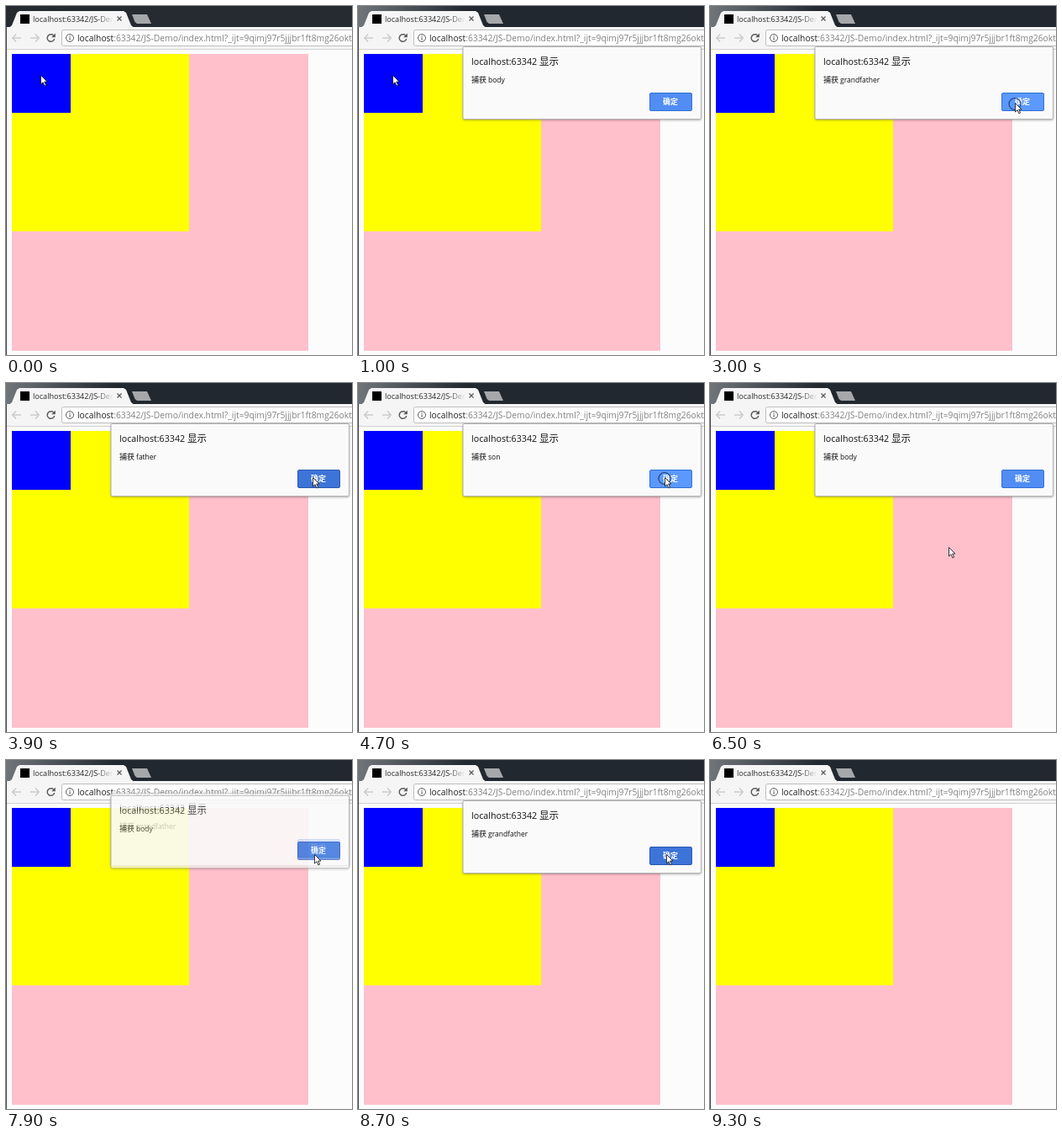
Write an HTML page with a canvas that moves like this. It is 412 px wide and 415 px high and loops after 9.4 s.

```html
<!DOCTYPE html>
<html lang="zh">
<head>
<meta charset="utf-8">
<title>Event capture</title>
<style>
html, body { margin: 0; width: 100%; height: 100%; overflow: hidden; background: #fcfcfc; }
canvas { display: block; }
</style>
</head>
<body>
<canvas id="stage" width="412" height="415"></canvas>
<script>
const W = 412, H = 415, LOOP = 9400, STEP = 100, LEAVE = 9300;
const stage = document.getElementById('stage').getContext('2d');
const sheet = document.createElement('canvas');
sheet.width = W;
sheet.height = H;
const layer = sheet.getContext('2d');

const LATIN = '"Open Sans", "Noto Sans", sans-serif';
const HAN = '"Noto Sans CJK SC", "Noto Sans CJK", sans-serif';
const GREY = '#5a5a5a', INK = '#111';
const BUTTON = { x: 347, y: 103, w: 51, h: 22 };

// each click and the message it brings up
const clicks = [
  [700, 'body'], [2200, 'grandfather'], [3000, 'father'], [3800, 'son'], [4700, ''],
  [6200, 'body'], [7700, 'grandfather'], [8600, '']
];

// pointer moves: start, end, goal x, goal y, overshoot
const moves = [
  [1100, 2100, 363, 115, 1.2],
  [3500, 3600, 365, 112, 0],
  [5000, 5500, 284, 195, 0],
  [6800, 7400, 367, 112, 1.2],
  [9100, 9200, 374, 118, 0]
];

function rect(c, x, y, w, h, fill) {
  c.fillStyle = fill;
  c.fillRect(x, y, w, h);
}

function shape(c, points, fill) {
  c.beginPath();
  points.forEach(([x, y]) => c.lineTo(x, y));
  c.closePath();
  c.fillStyle = fill;
  c.fill();
}

function line(c, points, color, width) {
  c.beginPath();
  points.forEach(([x, y]) => c.lineTo(x, y));
  c.strokeStyle = color;
  c.lineWidth = width;
  c.stroke();
}

function arc(c, x, y, r, color, width, from = 0, to = 7) {
  c.beginPath();
  c.arc(x, y, r, from, to);
  c.strokeStyle = color;
  c.lineWidth = width;
  c.stroke();
}

function panel(c, x, y, w, h, r, fill, border) {
  c.beginPath();
  c.roundRect(x + 0.5, y + 0.5, w - 1, h - 1, r);
  c.fillStyle = fill;
  c.fill();
  c.shadowColor = 'transparent';
  c.strokeStyle = border;
  c.lineWidth = 1;
  c.stroke();
}

function text(c, str, x, y, size, family, fill, weight = 400) {
  c.font = `${weight} ${size}px ${family}`;
  c.fillStyle = fill;
  c.fillText(str, x, y);
  return x + c.measureText(str).width;
}

function fadeOut(c, x0, x1, rgb) {
  const g = c.createLinearGradient(x0, 0, x1, 0);
  g.addColorStop(0, `rgb(${rgb})`);
  g.addColorStop(1, `rgba(${rgb},0)`);
  return g;
}

function arrow(c, x, dir) {
  line(c, [[x - 5 * dir, 38], [x + 5 * dir, 38]], '#c9c9c9', 1.4);
  line(c, [[x + dir, 33.5], [x + 5.3 * dir, 38], [x + dir, 42.5]], '#c9c9c9', 1.4);
}

function drawTabs(c, t) {
  const opened = t >= clicks[0][0];
  rect(c, 0, 0, W, 25, opened ? '#212830' : '#262a31');
  if (opened) rect(c, 0, 0, 130, 25, fadeOut(c, 0, 130, '112,117,122'));
  shape(c, [[4, 25.5], [7, 23], [13, 8], [16, 6], [140, 6], [143, 8], [149, 23], [152, 25.5]], '#f5f5f5');
  shape(c, [[150, 10], [168, 10], [173, 21], [156, 21], [153.5, 19]], '#a5a8ab');
  rect(c, 17, 10, 11, 11, '#000');
  text(c, 'localhost:63342/JS-Demo', 32, 18.5, 9.1, LATIN, fadeOut(c, 108, 128, '40,40,40'));
  line(c, [[132.5, 12.5], [137.5, 17.5]], GREY, 1.3);
  line(c, [[137.5, 12.5], [132.5, 17.5]], GREY, 1.3);
}

function drawToolbar(c) {
  rect(c, 0, 25, W, 26, '#f5f5f5');
  rect(c, 0, 51, W, 1, '#d2d2d2');
  arrow(c, 13, -1);
  arrow(c, 34, 1);
  arc(c, 53.5, 38, 4.3, GREY, 1.5, 0.25, 5.5);
  shape(c, [[58.8, 32.5], [58.8, 37.2], [54.2, 37.2]], GREY);

  panel(c, 66, 28, W, 20, 2, '#fff', '#bdbdbd');
  arc(c, 76, 38, 4.5, GREY, 1);
  rect(c, 75.5, 35.3, 1.1, 1.2, GREY);
  rect(c, 75.5, 37.3, 1.1, 3.4, GREY);
  const x = text(c, 'localhost', 85, 41.5, 10.3, LATIN, '#222');
  text(c, ':63342/JS-Demo/index.html?_ijt=9qimj97r5jjjbr1ft8mg26okt', x, 41.5, 10.3, LATIN, '#808080');
}

function drawPage(c) {
  rect(c, 0, 52, W, H - 52, '#fcfcfc');
  ['#ffc0cb', '#ff0', '#00f'].forEach((color, i) => {
    const side = Math.floor((500 - 200 * i) * 0.7061);
    rect(c, 7, 57, side, side, color);
  });
}

function drawDialog(c, message, state) {
  c.clearRect(0, 0, W, H);
  c.save();
  c.shadowColor = 'rgba(0,0,0,.4)';
  c.shadowBlur = 3;
  c.shadowOffsetY = 1;
  panel(c, 124.5, 48, 284.5, 87, 1.5, '#fafafa', '#b4b4b4');
  c.restore();
  text(c, 'localhost:63342', 135, 69.5, 10.7, LATIN, INK);
  text(c, '显示', 216, 69.5, 11.5, HAN, INK);
  text(c, '捕获', 135, 91, 9, HAN, INK);
  text(c, message, 155, 91, 8.5, LATIN, INK);

  const fill = { idle: '#518df2', hover: '#5b99fe', down: '#3d74d8' }[state];
  const { x, y, w, h } = BUTTON;
  panel(c, x, y, w, h, 1.5, fill, state === 'down' ? '#2a58b0' : '#3070d8');
  text(c, '确定', 363, 117, 9, HAN, '#fff', 700);
}

// share of a dialog change that is done after a click
function progress(t, click) {
  return Math.min(1, Math.max(0, (t - click - STEP) / (2 * STEP)));
}

function backOut(p, s) {
  const q = p - 1;
  return 1 + (s + 1) * q ** 3 + s * q ** 2;
}

function pointer(t) {
  let x = 41, y = 82;
  for (const [start, end, gx, gy, s] of moves) {
    if (t <= start) break;
    const k = backOut(Math.min(1, (t - start) / (end - start)), s);
    x += (gx - x) * k;
    y += (gy - y) * k;
  }
  return [Math.round(x), Math.round(y)];
}

function drawPointer(c, x, y) {
  c.save();
  c.translate(x + 0.5, y + 0.5);
  shape(c, [[0, 0], [0, 10.5], [2.5, 8.2], [4.4, 12.4], [6.1, 11.6], [4.2, 7.5], [7.5, 7.5]], '#fff');
  c.strokeStyle = '#222';
  c.lineWidth = 0.9;
  c.stroke();
  c.restore();
}

function overButton(x, y) {
  const dx = x - BUTTON.x, dy = y - BUTTON.y;
  return dx >= 0 && dx < BUTTON.w && dy >= 0 && dy < BUTTON.h;
}

function drawDialogs(c, t, x, y) {
  // an outgoing dialog lies above the incoming one
  for (let i = clicks.length - 2; i >= 0; i--) {
    const [open, message] = clicks[i];
    const close = clicks[i + 1][0];
    const shown = progress(t, open) - progress(t, close);
    if (!message || shown <= 0) continue;
    const state = t > close ? 'down' : overButton(x, y) ? 'hover' : 'idle';
    const reach = t > close ? 80 : 130;
    drawDialog(layer, message, state);
    c.globalAlpha = 1 - (1 - shown) ** 1.7;
    c.drawImage(sheet, 0, Math.round(-reach * (1 - shown) ** 3.8));
    c.globalAlpha = 1;
  }
}

function draw(t) {
  const [x, y] = pointer(t);
  drawPage(stage);
  drawTabs(stage, t);
  drawToolbar(stage);
  rect(stage, 0, 25, 1, H - 25, '#4a4a4a');
  drawDialogs(stage, t, x, y);
  if (clicks.some(([click]) => click === t)) arc(stage, x, y + 1.5, 7, '#28406f', 1.2);
  if (t < LEAVE) drawPointer(stage, x, y);
}

const begin = performance.now();
function tick() {
  const t = (performance.now() - begin) % LOOP;
  draw(Math.floor(t / STEP) * STEP);
  requestAnimationFrame(tick);
}
tick();
</script>
</body>
</html>
```
